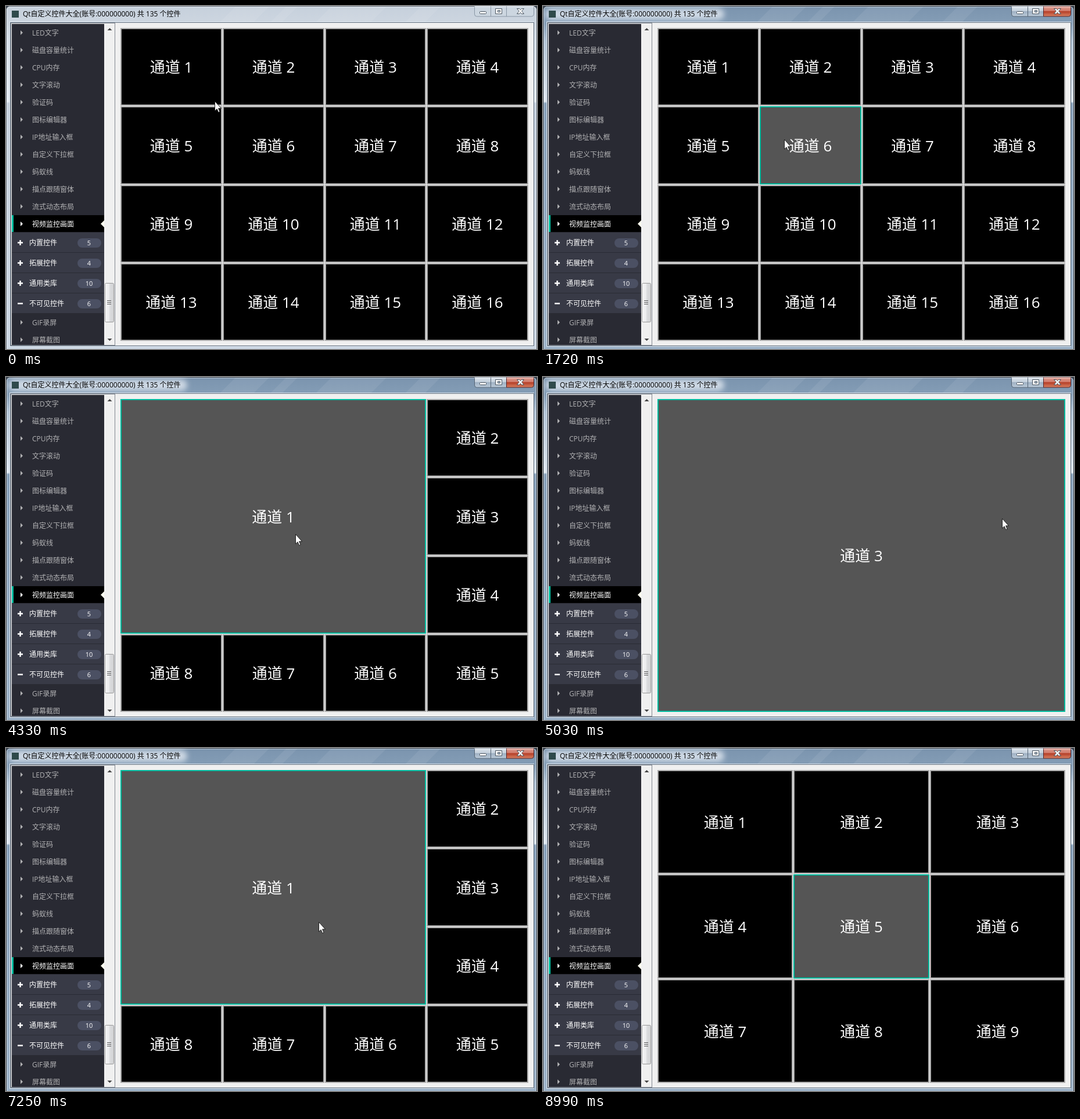
These frames come from a looping animation (914 px wide and 592 px high, 9270 ms). An HTML page:

```html
<!DOCTYPE html>
<html lang="zh-CN">
<head>
<meta charset="utf-8">
<title>控件大全</title>
<style>
  html, body { margin: 0; width: 100%; height: 100%; overflow: hidden; background: #39434e; }
  svg { display: block; width: 914px; height: 592px; }
  text { font: 12px "Open Sans", "Noto Sans CJK SC", "Noto Sans CJK", sans-serif; white-space: pre; }
  .cell text { font-size: 26px; fill: #fff; text-anchor: middle; }
  .cell rect { fill: #000; stroke: #aaa; stroke-width: 2; }
  .cell.focus rect { fill: #555; stroke: #00bb9e; }
  .child { fill: #b2b2b4; }
  .parent, .chosen { fill: #fff; }
  .badge { font-size: 11px; fill: #fff; text-anchor: middle; }
</style>
</head>
<body>
<svg viewBox="0 0 914 592">
  <defs>
    <linearGradient id="pale" x2="0" y2="1">
      <stop offset="0" stop-color="#c6d0dc"/><stop offset=".05" stop-color="#cdd6e0"/>
      <stop offset=".1" stop-color="#d8e1ea"/><stop offset=".275" stop-color="#e6edf4"/>
      <stop offset=".28" stop-color="#c6d1de"/><stop offset="1" stop-color="#cdd8e4"/>
    </linearGradient>
    <linearGradient id="blue" x2="0" y2="1">
      <stop offset="0" stop-color="#7b94ae"/><stop offset=".05" stop-color="#849db6"/>
      <stop offset=".1" stop-color="#b3c5d7"/><stop offset=".275" stop-color="#e1e9f2"/>
      <stop offset=".28" stop-color="#86a0ba"/><stop offset="1" stop-color="#9db3c9"/>
    </linearGradient>
    <linearGradient id="button" x2="0" y2="1">
      <stop offset="0" stop-color="#e2e9f0"/><stop offset=".48" stop-color="#c3cfdb"/>
      <stop offset=".5" stop-color="#9dafc2"/><stop offset="1" stop-color="#bccbd9"/>
    </linearGradient>
    <linearGradient id="close" x2="0" y2="1">
      <stop offset="0" stop-color="#e5aaa0"/><stop offset=".48" stop-color="#cf7565"/>
      <stop offset=".5" stop-color="#b33b25"/><stop offset="1" stop-color="#d98263"/>
    </linearGradient>
    <linearGradient id="thumb">
      <stop offset="0" stop-color="#f5f5f5"/><stop offset=".48" stop-color="#ebebed"/>
      <stop offset=".52" stop-color="#dcdddf"/><stop offset="1" stop-color="#d2d3d5"/>
    </linearGradient>
    <filter id="soft" x="-10%" y="-60%" width="120%" height="220%"><feGaussianBlur stdDeviation="5"/></filter>
    <clipPath id="list"><rect x="10" y="31" width="159" height="554"/></clipPath>
    <path id="streaks" fill="#fff" opacity=".07"
      d="M395 1h58l-27 27h-58zM482 1h20l-27 27h-20zM560 1h95l-27 27h-95zM714 1h34l-27 27h-34z"/>
    <g id="buttonIcons" fill="#fff" stroke="#49545f">
      <rect x="815.5" y="9.5" width="11" height="4" rx="1"/>
      <path fill-rule="evenodd" d="M842.5 4.5h11v9h-11zM846.5 7.5v3h4v-3z"/>
      <path d="M879.5 4.5h4l2 2.2 2-2.2h4l-3.8 4.3 3.8 4.7h-4l-2-2.5-2 2.5h-4l3.8-4.7z"/>
    </g>
  </defs>

  <g id="inactive">
    <rect x=".5" y=".5" width="913" height="598" rx="6" fill="url(#pale)" stroke="#56616d"/>
    <use href="#streaks"/>
    <path d="M806.5 0v14q0 4 4 4h94q4 0 4-4V0M834.5 0v18M861.5 0v18" fill="#ccd6e0" stroke="#8996a5"/>
    <use href="#buttonIcons"/>
  </g>
  <g id="active">
    <rect x=".5" y=".5" width="913" height="598" rx="6" fill="url(#blue)" stroke="#26323f"/>
    <use href="#streaks"/>
    <rect x="4" y="4" width="308" height="20" rx="10" fill="#e7edf4" opacity=".75" filter="url(#soft)"/>
    <path d="M806.5 0v14q0 4 4 4h51V0z" fill="url(#button)" stroke="#536273"/>
    <path d="M834.5 0v18" stroke="#536273"/>
    <path d="M861.5 0v18h43q4 0 4-4V0z" fill="url(#close)" stroke="#53252a"/>
    <use href="#buttonIcons"/>
  </g>

  <path d="M1.5 592V7q0-5.500 5.500-5.500h900q5.500 0 5.500 5.500v585" fill="none" stroke="#fff" opacity=".55"/>
  <rect x="10" y="8" width="12" height="12" fill="#2f4a4b"/>
  <text x="29" y="18">Qt自定义控件大全(账号:000000000) 共 135 个控件</text>

  <rect x="6.500" y="27.500" width="902" height="560" fill="none" stroke="#e3ebf3"/>
  <rect x="7.500" y="28.500" width="901" height="558" fill="#f0f0f0" stroke="#5d6b7a"/>
  <rect x="8.500" y="29.500" width="179" height="556" fill="#f0f0f0" stroke="#828790"/>
  <g id="sidebar" clip-path="url(#list)"></g>

  <path d="M174.500 42l4-4 4 4zM174.500 574l4 4 4-4z" fill="#444"/>
  <rect x="170.500" y="478.500" width="15" height="67" rx="2" fill="url(#thumb)" stroke="#979797"/>
  <path d="M174 508.500h7M174 511.500h7M174 514.500h7" stroke="#555"/>

  <g id="video"></g>
  <path id="cursor" d="M.5-.5V16l3.600-3.300 2.500 5.800 2.500-1-2.500-5.700h5z" fill="#fff" stroke="#111" stroke-width=".9"/>
</svg>
<script>
const LOOP = 9270;
const $ = id => document.getElementById(id);

function buildSidebar() {
  const children = ['LED文字', '磁盘容量统计', 'CPU内存', '文字滚动', '验证码', '图标编辑器',
    'IP地址输入框', '自定义下拉框', '蚂蚁线', '描点跟随窗体', '流式动态布局', '视频监控画面'];
  const parents = [['内置控件', 5], ['拓展控件', 4], ['通用类库', 10], ['不可见控件', 6]];

  const child = (label, top, chosen) => `
    <rect x="10" y="${top}" width="159" height="30" fill="#292a33"/>
    ${chosen ? `<rect x="10" y="${top}" width="159" height="29"/>
      <rect x="10" y="${top}" width="3" height="29" fill="#00bb9e"/>
      <path d="M169 ${top + 9}v12l-6-6z" fill="#fffff0"/>` : ''}
    <g class="${chosen ? 'chosen' : 'child'}">
      <path d="M25 ${top + 11}v8l4-4z"/><text x="45" y="${top + 20}">${label}</text>
    </g>`;

  const parent = ([label, count], top, open) => `
    <rect x="10" y="${top}" width="159" height="35" fill="#383a46"/>
    <path d="M10 ${top + 34.5}h159" stroke="#292b34"/>
    <path d="M20 ${top + 17.5}h9${open ? '' : `M24.500 ${top + 13}v9`}" stroke="#fff" stroke-width="2.400"/>
    <text class="parent" x="40" y="${top + 22}">${label}</text>
    <rect x="123" y="${top + 10}" width="41" height="16" rx="8" fill="#4b5063"/>
    <text class="badge" x="143" y="${top + 22}">${count}</text>`;

  $('sidebar').innerHTML =
    children.map((label, i) => child(label, 31 + i * 30, i === 11)).join('') +
    parents.map((item, i) => parent(item, 391 + i * 35, i === 3)).join('') +
    child('GIF录屏', 531) + child('屏幕截图', 561);
}

// Cells are [column, row, span] on a square grid.
const grid = n => Array.from({ length: n * n }, (_, i) => [i % n, Math.floor(i / n), 1]);
const layouts = {
  16: { size: 4, cells: grid(4) },
  9: { size: 3, cells: grid(3) },
  8: { size: 4, cells: [[0, 0, 3], [3, 0, 1], [3, 1, 1], [3, 2, 1], [3, 3, 1], [2, 3, 1], [1, 3, 1], [0, 3, 1]] }
};

function cellMarkup([col, row, span], size, channel, focused) {
  const edgeX = c => Math.round(197 + c * 703 / size);
  const edgeY = r => Math.round(38 + r * 541 / size);
  const x = edgeX(col), y = edgeY(row);
  const w = edgeX(col + span) - 1 - x, h = edgeY(row + span) - 1 - y;
  return `<g class="cell${focused ? ' focus' : ''}">
    <rect x="${x + 1}" y="${y + 1}" width="${w - 2}" height="${h - 2}"/>
    <text x="${x + w / 2}" y="${Math.ceil(y + h / 2) + 10}">通道 ${channel}</text></g>`;
}

// [start, layout, focused channel, maximised]
const scenes = [
  [0, 16, 0], [680, 16, 6], [1170, 16, 6, true], [1720, 16, 6],
  [3290, 8, 0], [3830, 8, 1], [3960, 8, 1, true], [4330, 8, 1],
  [4750, 8, 3], [5030, 8, 3, true], [5430, 8, 3], [6710, 8, 1],
  [7850, 9, 0], [8120, 9, 5]
];

// [first step, last step, step count, x, y]
const moves = [
  [400, 400, 1, 390, 205], [680, 680, 1, 415, 231],
  [1850, 2620, 7, 560, 300], [2900, 3160, 3, 601, 322],
  [3570, 3700, 2, 498, 272], [4460, 4750, 3, 790, 245],
  [5580, 5730, 2, 500, 238], [6410, 6560, 2, 459, 236],
  [6850, 7400, 5, 590, 345], [7550, 7700, 2, 631, 370],
  [8250, 8860, 6, 831, 569], [8990, 8990, 1, 940, 620]
];

function cursorAt(time) {
  let x = 359, y = 165;
  for (const [first, last, count, toX, toY] of moves) {
    if (time < first) break;
    const gap = (last - first) / (count - 1) || 1;
    const progress = Math.min(count, Math.floor((time - first) / gap + 0.001) + 1) / count;
    x += (toX - x) * progress;
    y += (toY - y) * progress;
  }
  return [Math.round(x), Math.round(y)];
}

function drawScene([, layout, focus, maximised]) {
  const { size, cells } = layouts[layout];
  $('video').innerHTML = maximised
    ? cellMarkup([0, 0, 1], 1, focus, true)
    : cells.map((cell, i) => cellMarkup(cell, size, i + 1, i + 1 === focus)).join('');
}

let shown;
const startTime = performance.now();

function render() {
  const time = (performance.now() - startTime) % LOOP;
  const scene = scenes.filter(([start]) => start <= time).pop();
  if (scene !== shown) drawScene(shown = scene);
  $('active').style.display = time < 400 ? 'none' : '';
  $('inactive').style.display = time < 400 ? '' : 'none';
  $('cursor').setAttribute('transform', `translate(${cursorAt(time)})`);
  requestAnimationFrame(render);
}

buildSidebar();
render();
</script>
</body>
</html>
```
